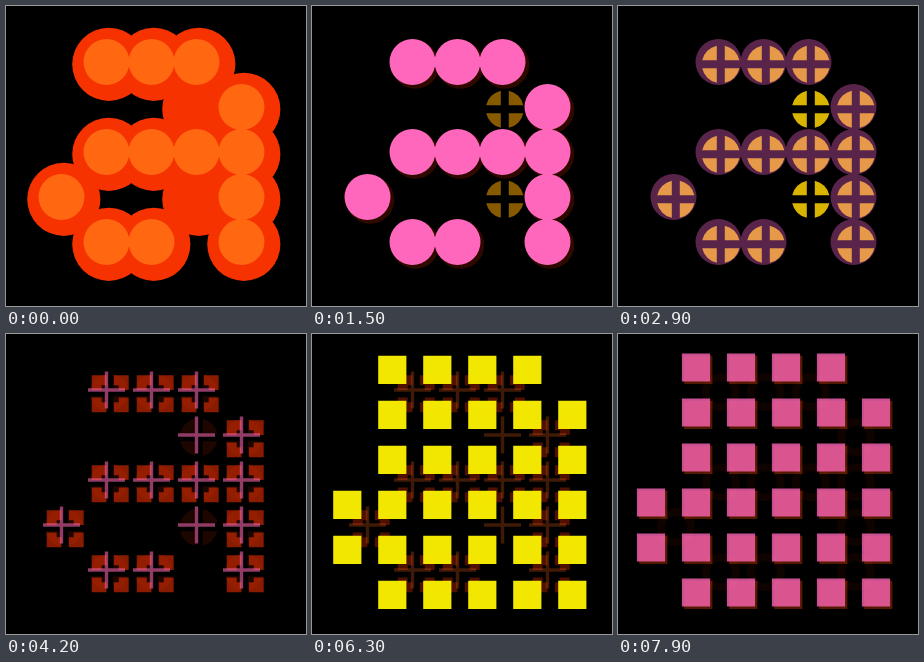
Recreate the animation shown at these times as an HTML page with a canvas. Size 300x300 px, loop 8000 ms.

```html
<!DOCTYPE html>
<html lang="en">
<head>
<meta charset="utf-8">
<title>Dot letter</title>
<style>
html, body { margin: 0; width: 100%; height: 100%; overflow: hidden; background: #000; }
canvas { display: block; width: 300px; height: 300px; }
</style>
</head>
<body>
<canvas id="stage" width="300" height="300"></canvas>
<script>
const ctx = document.getElementById('stage').getContext('2d');
const LOOP = 8000, PITCH = 45, DROP = 2.3, CYCLE = 3300;
const SIDES = [-1, 1];

// Letter bitmap: # is a dot, + is an extra joint
const rows = ['.###.', '...+#', '.####', '#..+#', '.##.#'];
const cells = [], dots = [];
rows.forEach((row, r) => [...row].forEach((mark, c) => {
  if (mark === '.') return;
  const p = [55.5 + c * PITCH, 56 + r * PITCH];
  cells.push(p);
  if (mark === '#') dots.push(p);
}));

// Points between the cells, each shared by up to four dots
const corners = new Map();
for (const [x, y] of dots) for (const sx of SIDES) for (const sy of SIDES) {
  const p = [x + sx * PITCH / 2, y + sy * PITCH / 2];
  corners.set(p.join(), p);
}
const knots = [...corners.values()];

function shape(points, offset, add) {
  const path = new Path2D();
  for (const [x, y] of points) add(path, x + offset, y + offset);
  return path;
}

const disc = r => (p, x, y) => {
  p.moveTo(x + r, y);
  p.arc(x, y, r, 0, Math.PI * 2);
};

const ring = (p, x, y) => {
  disc(19)(p, x, y);
  p.moveTo(x + 11, y);
  p.arc(x, y, 11, 0, Math.PI * 2, true);
};

const square = (p, x, y) => p.rect(x - 14.1, y - 14.1, 28.2, 28.2);

// Disc with a cross-shaped gap
function quarters(p, x, y) {
  const r = 19, gap = 4, a = Math.asin(gap / r);
  for (let q = 0; q < Math.PI * 2; q += Math.PI / 2) {
    const mid = q + Math.PI / 4, d = gap * Math.SQRT2;
    p.moveTo(x + d * Math.cos(mid), y + d * Math.sin(mid));
    p.arc(x, y, r, q + a, q + Math.PI / 2 - a);
    p.closePath();
  }
}

// Square with a cross-shaped gap and a square hole
function brackets(p, x, y) {
  const out = 18.5, hole = 8.5, gap = 3.7;
  for (const sx of SIDES) for (const sy of SIDES) {
    const to = (u, v) => p.lineTo(x + sx * u, y + sy * v);
    p.moveTo(x + sx * out, y + sy * out);
    to(gap, out); to(gap, hole); to(hole, hole); to(hole, gap); to(out, gap);
    p.closePath();
  }
}

function cross(p, x, y) {
  const arm = 18.5, w = 1.7;
  p.rect(x - arm, y - w, arm * 2, w * 2);
  p.rect(x - w, y - arm, w * 2, arm * 2);
}

// Front ink turns from orange to pink, again in each cycle
const front = born => t => {
  const age = Math.max(0, t - born) % CYCLE;
  return [255, 103, 17 + 200 * (1 - Math.exp(-age / 780))];
};

// Back ink glows from red to yellow around its peak and cools again
const back = peak => t => {
  const d = Math.min(1, Math.abs(t - peak) / 2000);
  return [246, 50 + 187 * Math.cos(d * Math.PI / 2) ** 2, 0];
};
const red = back(-LOOP);

// Opacity rises from a to b, holds until c, falls to nothing at d
const fade = (a, b, c, d) => t =>
  Math.max(0, Math.min(1, (t - a) / (b - a), (d - t) / (d - c)));

// Bottom to top
const layers = [
  [shape(cells, DROP, disc(36.6)), red, fade(-900, 0, 100, 850)],
  [shape(dots, DROP + 0.5, disc(24)), red, fade(-900, 0, 0, 1850)],
  [shape(cells, DROP, quarters), back(2350), fade(350, 2450, 2700, 4400)],
  [shape(dots, 0, disc(23)), front(0), fade(-900, 0, 1500, 3650)],
  [shape(dots, 3.7, brackets), red, fade(3000, 5150, 4600, 7100)],
  [shape(cells, 0, cross), front(2950), fade(3000, 5100, 5100, 6700)],
  [shape(dots, DROP, ring), red, fade(7400, 16000, LOOP * 2, LOOP * 3)],
  [shape(knots, DROP, square), back(6400), fade(4450, 6340, 7100, 8300)],
  [shape(knots, 0, square), front(6500), fade(6400, 7200, 7400, 9700)]
];

function draw(t) {
  ctx.globalAlpha = 1;
  ctx.fillStyle = '#000';
  ctx.fillRect(0, 0, 300, 300);
  for (const [path, ink, opacity] of layers) {
    ctx.globalAlpha = opacity(t);
    ctx.fillStyle = `rgb(${ink(t).map(Math.round).join()})`;
    ctx.fill(path);
  }
}

let start;
function tick(now) {
  start ??= now;
  draw(Math.max(0, now - start) % LOOP);
  requestAnimationFrame(tick);
}
draw(0);
requestAnimationFrame(tick);
</script>
</body>
</html>
```
